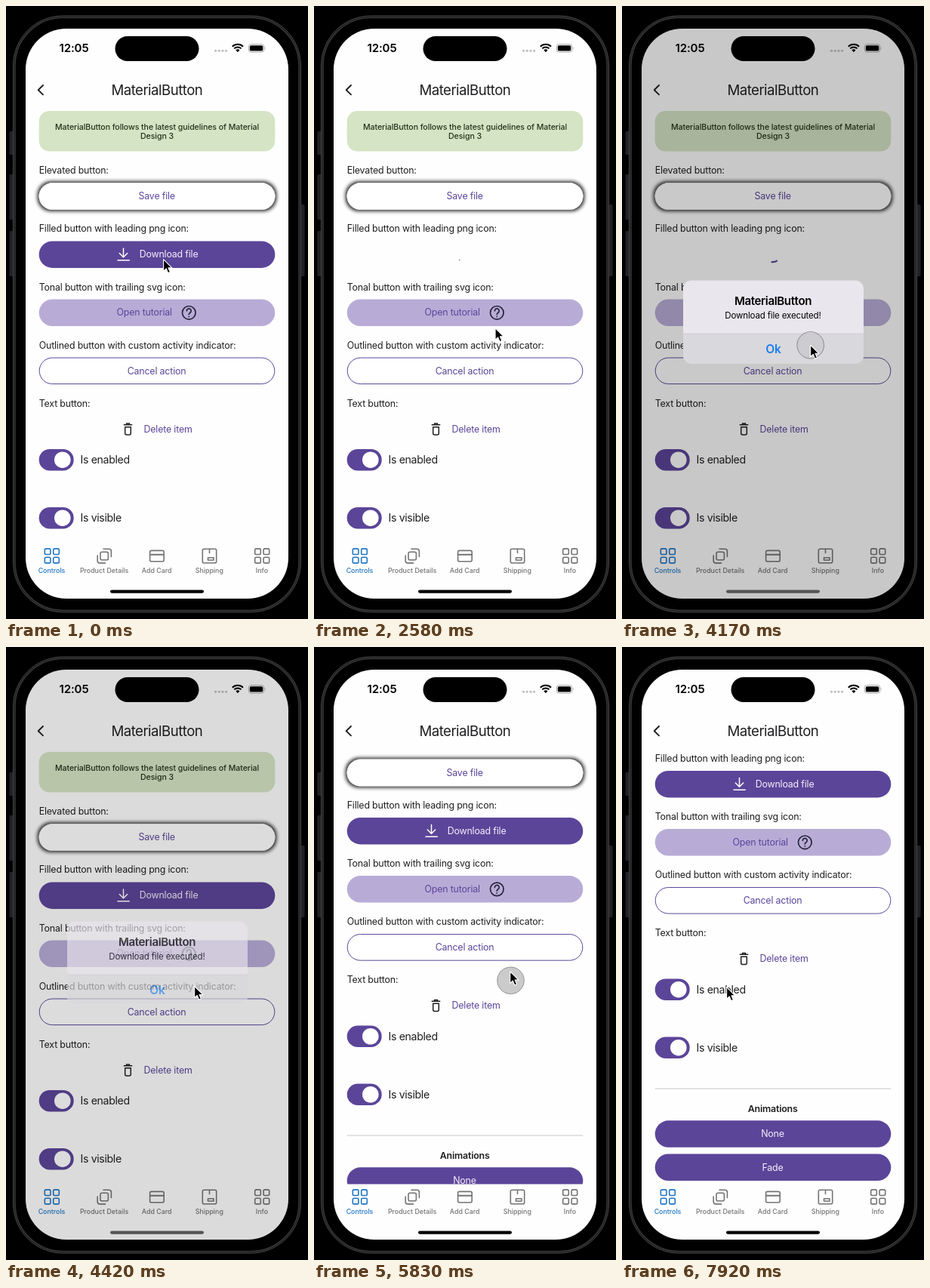
Recreate the animation shown at these times as an HTML page. Size 400x812 px, loop 8000 ms.

```html
<!DOCTYPE html>
<html lang="en">
<head>
<meta charset="utf-8">
<title>MaterialButton</title>
<style>
html, body { margin: 0; width: 100%; height: 100%; overflow: hidden; background: #000; }
svg { display: block; width: 100%; height: 100%; }
text { font-family: Inter, Roboto, sans-serif; }
.label { font-size: 12.4px; letter-spacing: -.17px; }
.big { font-size: 14.16px; letter-spacing: -.36px; }
.tab { font-size: 8.85px; font-weight: 500; }
.mid { text-anchor: middle; }
</style>
</head>
<body>
<svg viewBox="0 0 400 812">
  <defs>
    <clipPath id="screenClip"><rect x="26" y="30" width="348" height="755" rx="54"/></clipPath>
    <clipPath id="pageClip"><rect x="26" y="139" width="348" height="572.5"/></clipPath>
    <filter id="shadow" x="-5%" y="-40%" width="110%" height="180%">
      <feMorphology in="SourceAlpha" operator="dilate" radius="1.5"/>
      <feGaussianBlur stdDeviation="2.6"/>
      <feComponentTransfer result="soft"><feFuncA type="linear" slope=".85"/></feComponentTransfer>
      <feMerge><feMergeNode in="soft"/><feMergeNode in="SourceGraphic"/></feMerge>
    </filter>
  </defs>
  <g id="body"></g>
  <g clip-path="url(#screenClip)">
    <rect x="26" y="30" width="348" height="755" fill="#fefefe"/>
    <g clip-path="url(#pageClip)"><g id="page"></g></g>
    <g id="chrome"></g>
    <rect id="dim" x="26" y="30" width="348" height="755"/>
    <rect x="144.500" y="40" width="111" height="33" rx="16.500"/>
    <rect id="home" x="138" y="773.500" width="124" height="4.200" rx="2.100"/>
  </g>
  <g id="alert">
    <rect x="81" y="363.500" width="239" height="110" rx="11" fill="#e9e6ed"/>
    <path id="row" d="M81 434H320V462.500A11 11 0 0 1 309 473.500H92A11 11 0 0 1 81 462.500Z" fill="#d9d8dc"/>
    <path d="M81 434H320" stroke="#c4c2c8" stroke-width=".6"/>
    <text class="mid" x="200" y="396" font-size="15.050" font-weight="600" letter-spacing="-.35">MaterialButton</text>
    <text class="mid" x="200" y="413.500" font-size="11.500" letter-spacing="-.15">Download file executed!</text>
    <text class="mid" x="200.500" y="460" font-size="15.500" font-weight="600" fill="#1a7ef0">Ok</text>
  </g>
  <circle id="touch" r="17.800" fill="#000" stroke="#000" stroke-opacity=".35"/>
  <path id="cursor" d="M.6 .6V16.100L4.200 12.800L6.600 18.600L9.400 17.400L7 11.800H11.800Z" stroke="#fff" stroke-width="1.100" stroke-linejoin="round"/>
</svg>
<script>
const LOOP = 8000, STEP = 1000 / 12;
const PURPLE = '#5b4599', TONAL = '#b8acd7', INK = '#1f1f21', GREY = '#747476', BLUE = '#2176c4';
const $ = id => document.getElementById(id);

const text = (x, y, str, cls = 'label', fill = INK, extra = '') =>
  `<text x="${x}" y="${y}" class="${cls}" fill="${fill}" ${extra}>${str}</text>`;
const box = (x, y, w, h, rx, attrs) =>
  `<rect x="${x}" y="${y}" width="${w}" height="${h}" rx="${rx}" ${attrs}/>`;
const line = (d, color, width) =>
  `<path d="${d}" fill="none" stroke="${color}" stroke-width="${width}" stroke-linecap="round" stroke-linejoin="round"/>`;
const pill = (y, attrs) => box(43.7, y, 312.6, 35.5, 17.75, attrs);
const filled = (y, str) =>
  pill(y, `fill="${PURPLE}"`) + text(199.5, y + 22, str, 'label mid', '#f4f0fa');
const toggle = (y, str) =>
  box(43.7, y - 14.3, 46, 28.6, 14.3, `fill="${PURPLE}"`) +
  `<circle cx="74.800" cy="${y}" r="10.800" fill="#fff"/>` + text(98.5, y + 5, str, 'big');

function buildBody() {
  const keys = [[4.5, 166, 31], [4.5, 223, 60], [4.5, 298, 60], [389.5, 263, 95]];
  return keys.map(([x, y, h]) => box(x, y, 6, h, 1.5, 'fill="#222224"')).join('') +
    box(9.5, 13, 381, 790, 66, 'fill="#1c1c1d" stroke="#454547"') +
    box(12, 15.5, 376, 785, 63.5, 'fill="#000" stroke="#363638" stroke-width="1.500"');
}

function buildPage() {
  const labels = ['Elevated button:', 'Filled button with leading png icon:',
    'Tonal button with trailing svg icon:', 'Outlined button with custom activity indicator:', 'Text button:'];
  return box(43.7, 139, 312.6, 53.5, 14, 'fill="#d5e4c4"') +
    ['MaterialButton follows the latest guidelines of Material', 'Design 3'].map((s, i) =>
      text(200, 163.8 + i * 12.4, s, 'mid', '#22331a', 'font-size="10.600" font-weight="500" letter-spacing="-.080"')).join('') +
    labels.map((s, i) => text(43.7, 222.3 + i * 77.1, s)).join('') +
    pill(234.3, 'fill="#fff" filter="url(#shadow)"') + text(199.7, 256.2, 'Save file', 'label mid', PURPLE) +
    '<g id="download">' + pill(311.4, `fill="${PURPLE}"`) +
    line('M155.500 321V332.500M150.300 327.500L155.500 332.700L160.700 327.500M148 336.800H163.300', '#fff', 1.5) +
    text(176.7, 333.3, 'Download file', 'label', '#f4f0fa') + '</g>' +
    `<path id="spinner" fill="none" stroke="${PURPLE}" stroke-width="2.200"/>` +
    pill(388.5, `fill="${TONAL}"`) + text(146.5, 410.4, 'Open tutorial', 'label', PURPLE) +
    `<circle cx="242.300" cy="406.300" r="8.800" fill="none" stroke="#28233a" stroke-width="1.700"/>` +
    line('M239.400 403.900A2.900 2.900 0 1 1 243.900 406.200Q242.300 407.300 242.300 408.500M242.300 411.300V411.400', '#28233a', 1.7) +
    box(44.2, 466, 311.6, 34.6, 17.3, `fill="#fff" stroke="${PURPLE}"`) +
    text(199.5, 487.5, 'Cancel action', 'label mid', PURPLE) +
    line('M156.300 554.800H166.700M159.500 554.500V553H163.500V554.500M157.700 557.700V566Q157.700 568 159.700 568H163.300Q165.300 568 165.300 566V557.700Z', INK, 1.5) +
    text(182.5, 564.6, 'Delete item', 'label', PURPLE) +
    toggle(601.2, 'Is enabled') + toggle(678.2, 'Is visible') +
    '<path d="M43.700 732.500H356.300" stroke="#c6c6c8"/>' +
    text(199.7, 763, 'Animations', 'label mid', INK, 'font-weight="600"') +
    filled(774.8, 'None') + filled(819, 'Fade');
}

function buildChrome() {
  const grid = (x, c) => [0, 11.4].flatMap(dx => [0, 11.4].map(dy =>
    box(x + dx, 718.9 + dy, 7.6, 7.6, 1.7, `fill="none" stroke="${c}" stroke-width="1.600"`))).join('');
  const tabs = ['Controls', 'Product Details', 'Add Card', 'Shipping', 'Info'];
  const wifi = [[299.8, 53.7, 10], [302.3, 56.4, 6.4]].map(([x, y, r]) =>
    `<path d="M${x} ${y}A${r} ${r} 0 0 1 ${613.8 - x} ${y}" fill="none" stroke="#000" stroke-width="2"/>`).join('');
  return text(90, 61.4, '12:05', 'mid', '#000', 'font-size="15.050" font-weight="600" letter-spacing="-.150"') +
    [0, 1, 2, 3].map(i => `<circle cx="${277.5 + i * 4.7}" cy="59.300" r="1.500" fill="#bcbcbe"/>`).join('') +
    wifi + '<path d="M304.300 58.300A4 4 0 0 1 309.500 58.300L306.900 61.200Z"/>' +
    box(321.3, 50.7, 20.5, 10.4, 3.2, 'fill="none" stroke="#a0a0a2" stroke-width=".900"') +
    box(322.8, 52.2, 17.5, 7.4, 1.9, 'fill="#000"') +
    '<path d="M343.200 54.200Q344.800 55.800 343.200 57.500Z" fill="#a0a0a2"/>' +
    line('M49 105L42.700 111.200L49 117.400', INK, 1.9) +
    text(199.9, 118, 'MaterialButton', 'mid', INK, 'font-size="18.600" letter-spacing="-.500"') +
    grid(51.3, BLUE) + grid(329.7, GREY) +
    box(125, 723.3, 10.4, 10.4, 2, `fill="none" stroke="${GREY}" stroke-width="1.600"`) +
    line('M129 719.300H136.500Q139.400 719.300 139.400 722.200V729.500M121.200 728V735Q121.200 737.900 124.100 737.900H131.500', GREY, 1.6) +
    box(190.6, 721.4, 18.6, 14.4, 2, `fill="none" stroke="${GREY}" stroke-width="1.600"`) +
    line('M191 726.800H209', GREY, 2) +
    box(260.3, 719.3, 18.4, 18.4, 2, `fill="none" stroke="${GREY}" stroke-width="1.600"`) +
    line('M269.500 719.500V724.500M267.500 730.700H275V734H267.500Z', GREY, 1.6) +
    tabs.map((s, i) => text(60.5 + i * 69.6, 751.3, s, 'tab mid', i ? GREY : BLUE)).join('');
}

const clamp = v => Math.max(0, Math.min(1, v));
const inOut = u => u < .5 ? 4 * u ** 3 : 1 - 4 * (1 - u) ** 3;

// Monotone cubic through [time, value] keys.
function follow(keys, t) {
  const n = keys.length - 1;
  if (t <= keys[0][0]) return keys[0][1];
  if (t >= keys[n][0]) return keys[n][1];
  const slope = i => (keys[i + 1][1] - keys[i][1]) / (keys[i + 1][0] - keys[i][0]);
  const tangent = i => {
    if (i === 0 || i === n) return 0;
    const a = slope(i - 1), b = slope(i);
    return a * b <= 0 ? 0 : 2 * a * b / (a + b);
  };
  const i = keys.findIndex(k => k[0] > t) - 1;
  const [t0, v0] = keys[i], [t1, v1] = keys[i + 1];
  const h = t1 - t0, u = (t - t0) / h, w = 1 - u;
  return v0 * (1 + 2 * u) * w * w + v1 * u * u * (3 - 2 * u) +
    h * u * w * (tangent(i) * w - tangent(i + 1) * u);
}

const pointerX = [[900, 208], [1417, 213], [1900, 213], [3000, 252], [3400, 252], [4000, 249],
  [4400, 249], [5080, 262], [5250, 262], [6420, 255], [6700, 254], [7650, 138]];
const pointerY = [[900, 335], [1417, 327], [1900, 327], [3000, 473], [3400, 473], [4000, 448.5],
  [4400, 448.5], [5000, 521], [5080, 521], [5167, 518.5], [5250, 512.5], [5500, 480], [5900, 422],
  [6333, 392.5], [6420, 389], [6670, 380], [6800, 380], [7650, 450]];
const scrollY = [[5167, 0], [5250, 1.5], [5500, 34], [5900, 93], [6333, 124], [6420, 127.5],
  [6670, 137], [7200, 147.5]];
const presses = [[1000, 1250], [4140, 4330], [5080, 6670]];
const BUSY = [1250, 4400], SPIN = 4000 / 3;

function spinnerPath(ms) {
  const cycle = Math.floor(ms / SPIN), p = ms / SPIN - cycle;
  const grow = inOut(clamp(p * 2)), shrink = inOut(clamp(p * 2 - 1));
  const base = -82 + 360 * ms / SPIN + 213 * cycle;
  const from = base + 213 * shrink, to = base + 213 * grow + 4;
  const point = deg => {
    const a = deg * Math.PI / 180;
    return `${199.5 + 10 * Math.cos(a)} ${329.2 + 10 * Math.sin(a)}`;
  };
  return `M${point(from)}A10 10 0 ${to - from > 180 ? 1 : 0} 1 ${point(to)}`;
}

function render(t) {
  const busy = t >= BUSY[0] && t < BUSY[1];
  $('download').style.display = busy ? 'none' : '';
  $('spinner').setAttribute('d', busy ? spinnerPath(t - BUSY[0]) : '');
  $('page').setAttribute('transform', `translate(0 ${-follow(scrollY, t)})`);

  const shown = 1 - (1 - clamp((t - 3250) / 300)) ** 2;
  const level = shown * (1 - clamp((t - 4330) / 250));
  const scale = 1.2 - .2 * shown;
  $('dim').setAttribute('opacity', .213 * level);
  $('home').setAttribute('fill', `rgb(${Array(3).fill(Math.round(85 * Math.min(1, level * 2)))})`);
  $('alert').setAttribute('opacity', level);
  $('alert').setAttribute('transform', `translate(200.5 418.5) scale(${scale}) translate(-200.5 -418.5)`);
  $('row').setAttribute('opacity', t >= 4080 ? 1 : 0);

  // The touch ring trails the pointer by one step and fills in after contact.
  const press = presses.find(([a, b]) => t >= a && t < b);
  const fill = press ? .2 * clamp((t - press[0]) / 100) : 0;
  $('touch').setAttribute('opacity', press ? 1 : 0);
  $('touch').setAttribute('fill-opacity', fill);
  $('touch').setAttribute('transform',
    `translate(${follow(pointerX, t - STEP) + .7} ${follow(pointerY, t - STEP) + .8})`);
  $('cursor').setAttribute('transform', `translate(${follow(pointerX, t)} ${follow(pointerY, t)})`);
}

$('body').innerHTML = buildBody();
$('page').innerHTML = buildPage();
$('chrome').innerHTML = buildChrome();

const start = performance.now();
function tick() {
  const t = (performance.now() - start) % LOOP;
  render(Math.floor((t + 4) / STEP) * STEP % LOOP);
  requestAnimationFrame(tick);
}
tick();
</script>
</body>
</html>
```
